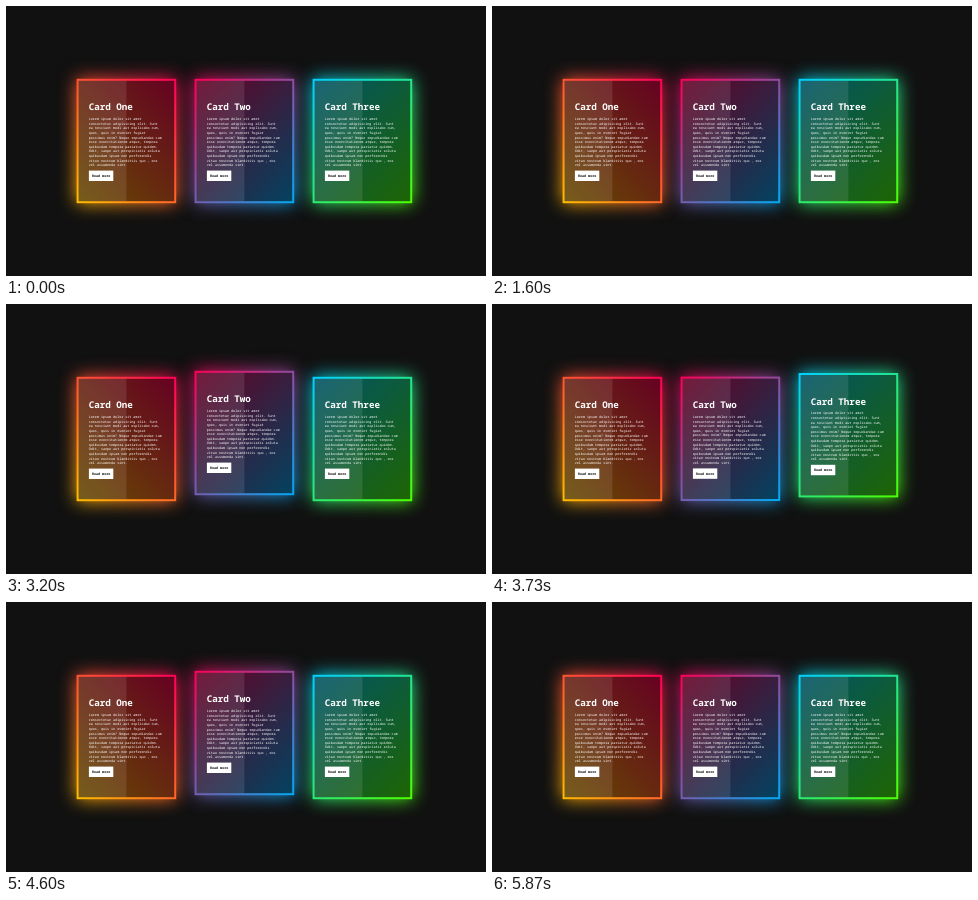
Write an HTML page that moves like this. It is 480 px wide and 270 px high and loops after 5940 ms.

```html
<!DOCTYPE html>
<html lang="en">
<head>
<meta charset="utf-8">
<title>Glowing cards</title>
<style>
  html, body { margin: 0; width: 100%; height: 100%; overflow: hidden; background: #111; }
  svg { display: block; width: 480px; height: 270px; }
  text { font-family: "Noto Sans Mono", "DejaVu Sans Mono", monospace; fill: #fff; text-rendering: geometricPrecision; white-space: pre; }
  .title { font-size: 9.2px; font-weight: 700; }
  .copy { font-size: 3.38px; }
  .label { font-size: 3.38px; font-weight: 600; fill: #111; }
</style>
</head>
<body>
<svg id="stage" viewBox="0 0 480 270">
  <defs>
    <filter id="blur" x="-50%" y="-50%" width="200%" height="200%" color-interpolation-filters="sRGB">
      <feGaussianBlur stdDeviation="9"/>
    </filter>
  </defs>
</svg>
<script>
const LOOP = 5940, EASE_TIME = 500, LIFT = 6;
const W = 99.6, H = 124.4, LEFT = 70.6, TOP = 72.8, PITCH = 118, EDGE = 2;
const COPY = [
  "Lorem ipsum dolor sit amet",
  "consectetur adipisicing elit. Sunt",
  "ea nesciunt modi aut explicabo cum,",
  "quos, quis in eveniet fugiat",
  "possimus enim? Neque repudiandae cum",
  "esse exercitationem atque, tempora",
  "quibusdam tempora pariatur quidem.",
  "Odit, saepe aut perspiciatis soluta",
  "quibusdam ipsam non perferendis",
  "vitae nostrum blanditiis quo , eos",
  "vel assumenda sint."
];

// side: 1 runs the gradient to the top right, -1 to the top left.
const CARDS = [
  { title: "Card One", from: "#ffbc00", to: "#ff0058", side: 1 },
  { title: "Card Two", from: "#03a9f4", to: "#ff0058", side: -1 },
  { title: "Card Three", from: "#4dff03", to: "#00d0ff", side: -1 }
];

// An unseen pointer sweeps back and forth over the cards.
const HOVERS = [
  { card: 2, enter: 100, leave: 1130 },
  { card: 1, enter: 1600, leave: 1850 },
  { card: 0, enter: 1950, leave: 2600 },
  { card: 1, enter: 2700, leave: 3380 },
  { card: 2, enter: 3540, leave: 4120 },
  { card: 1, enter: 4400, leave: 4700 },
  { card: 0, enter: 4780, leave: 5050 }
];

const stage = document.getElementById("stage");

function add(parent, name, attrs, text) {
  const el = document.createElementNS("http://www.w3.org/2000/svg", name);
  for (const key in attrs) el.setAttribute(key, attrs[key]);
  if (text) el.textContent = text;
  return parent.appendChild(el);
}

function rect(parent, x, y, width, height, fill, more) {
  return add(parent, "rect", { x, y, width, height, fill, ...more });
}

function addGradient(id, { from, to, side }) {
  const r = (W + H) / 4;
  const gradient = add(stage.querySelector("defs"), "linearGradient", {
    id, gradientUnits: "userSpaceOnUse",
    x1: W / 2 - side * r, y1: H / 2 + r, x2: W / 2 + side * r, y2: H / 2 - r
  });
  add(gradient, "stop", { offset: 0, "stop-color": from });
  add(gradient, "stop", { offset: 1, "stop-color": to });
}

function buildCard(data, i) {
  const id = "shade" + i, fill = `url(#${id})`;
  addGradient(id, data);
  const place = add(stage, "g", { transform: `translate(${LEFT + i * PITCH} ${TOP})` });
  const card = add(place, "g", {});
  const innerW = W - 2 * EDGE, innerH = H - 2 * EDGE;
  rect(card, 0, 0, W, H, fill, { filter: "url(#blur)" });
  rect(card, 0, 0, W, H, fill);
  rect(card, EDGE, EDGE, innerW, innerH, "#000", { "fill-opacity": 0.6 });
  rect(card, EDGE, EDGE, innerW / 2, innerH, "#fff", { "fill-opacity": 0.1 });
  add(card, "text", { class: "title", x: 12.2, y: 31.7 }, data.title);
  COPY.forEach((line, n) => add(card, "text", { class: "copy", x: 12.2, y: 41.3 + n * 4.61 }, line));
  rect(card, 12.3, 91.8, 24.4, 10.4, "#fff");
  add(card, "text", { class: "label", x: 24.5, y: 98.2, "text-anchor": "middle" }, "Read more");
  return card;
}

// Quick start, long settle, close to the CSS "ease" curve.
function ease(ms) {
  const u = Math.min(1, Math.max(0, ms / EASE_TIME));
  const v = 1 - (1 - u) ** 1.85;
  return v * v * (3 - 2 * v);
}

function liftOf(card, t) {
  return HOVERS.filter(h => h.card === card)
    .reduce((sum, h) => sum + ease(t - h.enter) - ease(t - h.leave), 0) * LIFT;
}

const cards = CARDS.map(buildCard);
const start = performance.now();

function draw() {
  const t = (performance.now() - start) % LOOP;
  cards.forEach((card, i) => card.setAttribute("transform", `translate(0 ${-liftOf(i, t)})`));
  requestAnimationFrame(draw);
}
draw();
</script>
</body>
</html>
```
